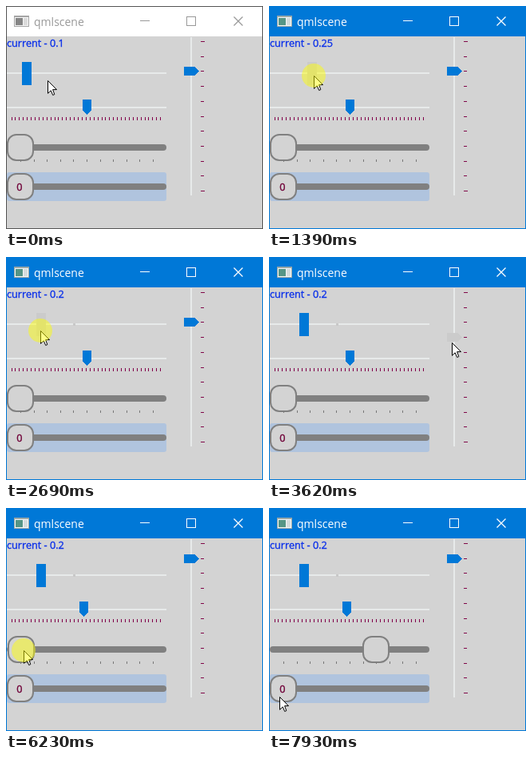
Animation, 322 px wide and 279 px high, one loop 8 s. Source, as an HTML page:

```html
<!DOCTYPE html>
<html lang="en">
<head>
<meta charset="utf-8">
<title>qmlscene</title>
<style>
  html, body { margin: 0; width: 100%; height: 100%; overflow: hidden; background: #d3d3d3; }
  svg { display: block; width: 322px; height: 279px; }
  text { font-family: "Open Sans", "Noto Sans", sans-serif; }
  .crisp { shape-rendering: crispEdges; }
  .knob { fill: #d3d3d3; stroke: #808080; stroke-width: 2; }
  .inked { stroke: currentColor; stroke-width: .35; fill: currentColor; font-size: 12.7px; }
</style>
</head>
<body>
<svg viewBox="0 0 322 279">
  <rect width="322" height="279" fill="#d3d3d3"/>
  <rect id="bar" width="322" height="38"/>
  <g id="icon" class="crisp">
    <rect x="10" y="12" width="19" height="14" fill="#9aa8a8"/>
    <rect x="11" y="14" width="17" height="11" fill="#f4f6f6"/>
    <rect x="12" y="15" width="9" height="9" fill="#559586"/>
    <rect x="22" y="15" width="5" height="9" fill="#d5dcdd"/>
  </g>
  <text id="title" x="35" y="25" font-size="14">qmlscene</text>
  <g id="buttons" fill="none">
    <path d="M168 18.5h12M226.5 13.5h11v11h-11z" class="crisp"/>
    <path d="M285.5 13.5l11 11m0-11l-11 11" stroke-width="1.3"/>
  </g>
  <text id="label" class="inked" x="1" y="51" color="#0a30ea"></text>

  <g class="crisp" fill="#e7eaea">
    <rect x="1" y="83" width="200" height="2"/>
    <rect x="1" y="126" width="200" height="2"/>
    <rect x="231" y="39" width="2" height="198"/>
  </g>
  <rect id="speck" x="84" y="83" width="3" height="3" fill="#c8c8c8"/>
  <path id="ticks" class="crisp" stroke="#800048"/>
  <path id="plain" d="M0 70h12v29h-12z" class="crisp"/>
  <path id="tick" d="M0 117h11v13.5l-5.5 5.5l-5.5-5.5z" class="crisp"/>
  <path id="side" d="M223 0h13.5l5.5 5.5l-5.5 5.5h-13.5z" class="crisp"/>

  <rect x="1" y="208" width="200" height="36" rx="3" fill="#b0c4de"/>
  <g fill="#808080">
    <rect x="1" y="173" width="200" height="8" rx="4"/>
    <rect x="1" y="222" width="200" height="8" rx="4"/>
  </g>
  <path id="dots" class="crisp" stroke="#777"/>
  <rect id="knob" class="knob" y="161" width="32" height="32" rx="11"/>
  <rect class="knob" x="2" y="210" width="32" height="32" rx="11"/>
  <text class="inked" x="17" y="231" text-anchor="middle" color="#700038">0</text>

  <rect id="border" x=".5" y=".5" width="321" height="278" fill="none"/>
  <g id="pointer">
    <path d="M.5 .5V16.3L4.2 12.8L6.7 18.5L8.8 17.6L6.6 11.6H11.5z" fill="#fff" stroke="#000"/>
    <circle id="halo" r="15" fill="#ff0" fill-opacity=".47"/>
  </g>
</svg>
<script>
const LOOP = 8000, FRAMES = 104, STEP = LOOP / FRAMES;
const RELEASE = 80; // a slider stays held this long after a drag stops
const $ = id => document.getElementById(id);
const set = (id, name, value) => $(id).setAttribute(name, value);
const show = (id, on) => set(id, 'visibility', on ? 'visible' : 'hidden');
const repeat = (n, fn) => Array.from({ length: n }, (_, i) => fn(i)).join('');

// Pointer gestures: start, end, x, y, slider being dragged
const start = [53, 93];
const gestures = [
  [0, 390, 25, 83],
  [540, 620, 22, 81],
  [770, 1540, 64, 88, 'plain'],
  [1540, 1770, 170, 89, 'plain'],
  [1850, 2690, 43, 92, 'plain'],
  [2920, 3400, 231, 84],
  [3460, 3620, 229, 107, 'side'],
  [3690, 4000, 237, 73, 'side'],
  [4240, 4600, 102, 126],
  [4600, 4770, 55, 126, 'tick'],
  [4850, 4930, 63, 125],
  [5080, 5300, 122, 126, 'tick'],
  [5300, 5460, 98, 126, 'tick'],
  [5540, 5920, 27, 178],
  [6000, 6080, 21, 178],
  [6230, 7150, 137, 184, 'knob'],
  [7230, 7930, 13, 236]
];

function cursor(t) {
  let [x, y] = start;
  for (const [from, to, nx, ny] of gestures) {
    if (t <= from) break;
    const f = Math.min(1, (t - from) / (to - from));
    x += (nx - x) * f;
    y += (ny - y) * f;
  }
  return [Math.round(x), Math.round(y)];
}

const lastDrag = (name, t) => gestures.findLast(g => g[4] === name && g[0] <= t);

function heldSlider(t) {
  const [, end, , , name] = gestures.findLast(g => g[0] <= t);
  return t < end + RELEASE ? name : undefined;
}

// Where the pointer last dragged a slider to, along one axis
function dragged(name, t, axis, initial) {
  const drag = lastDrag(name, t);
  return drag ? cursor(Math.min(t, drag[1]))[axis] : initial;
}

function paintHandle(name, t, left, top, width, height) {
  const [x, y] = cursor(t);
  const near = Math.abs(x - left - width / 2) < width / 2 + 4 &&
               Math.abs(y - top - height / 2) < height / 2;
  set(name, 'fill', heldSlider(t) === name ? '#cbcbcb' : near ? '#171717' : '#0078d7');
}

function draw(t) {
  const active = t >= 770;
  const ink = active ? '#fff' : '#999';
  set('bar', 'fill', active ? '#0078d7' : '#fff');
  set('border', 'stroke', active ? '#0078d7' : '#555');
  set('title', 'fill', ink);
  set('buttons', 'stroke', ink);
  $('icon').style.filter = active ? '' : 'grayscale(1)';

  const value = Math.round((dragged('plain', t, 0, 22) - 6) / 9.4) * 0.05;
  const plainX = Math.round(188 * value + 0.7);
  $('label').textContent = 'current - ' + +value.toFixed(2);
  set('plain', 'transform', `translate(${plainX})`);
  paintHandle('plain', t, plainX, 70, 12, 29);
  show('speck', t >= 1620);

  const tickX = dragged('tick', t, 0, 102) - 6;
  set('tick', 'transform', `translate(${tickX})`);
  paintHandle('tick', t, tickX, 117, 11, 19);

  const notch = Math.round((dragged('side', t, 1, 87) - 50) / 18.7);
  const sideY = Math.round(39 + 18.7 * notch);
  set('side', 'transform', `translate(0 ${sideY})`);
  paintHandle('side', t, 223, sideY, 19, 11);

  const held = heldSlider(t);
  set('knob', 'x', dragged('knob', t, 0, 21) - 19);
  $('knob').style.fill = held === 'knob' && t > 6300 ? '#fff' : '';

  set('pointer', 'transform', `translate(${cursor(t)})`);
  show('halo', held && held !== 'side');
}

set('ticks', 'd',
  repeat(39, i => `M${Math.floor(7 + 4.914 * i) + 0.5} 139v4`) +
  repeat(11, i => `M244 ${Math.round(44 + 18.7 * i) + 0.5}h${i % 10 ? 4 : 5}`));
set('dots', 'd', repeat(11, i => `M${Math.round(18 + 16.6 * i) + 0.5} 192v3`));

function frame() {
  const index = Math.floor((performance.now() % LOOP + 7) / STEP);
  draw(Math.min(FRAMES - 1, index) * STEP + 7);
  requestAnimationFrame(frame);
}
frame();
</script>
</body>
</html>
```
